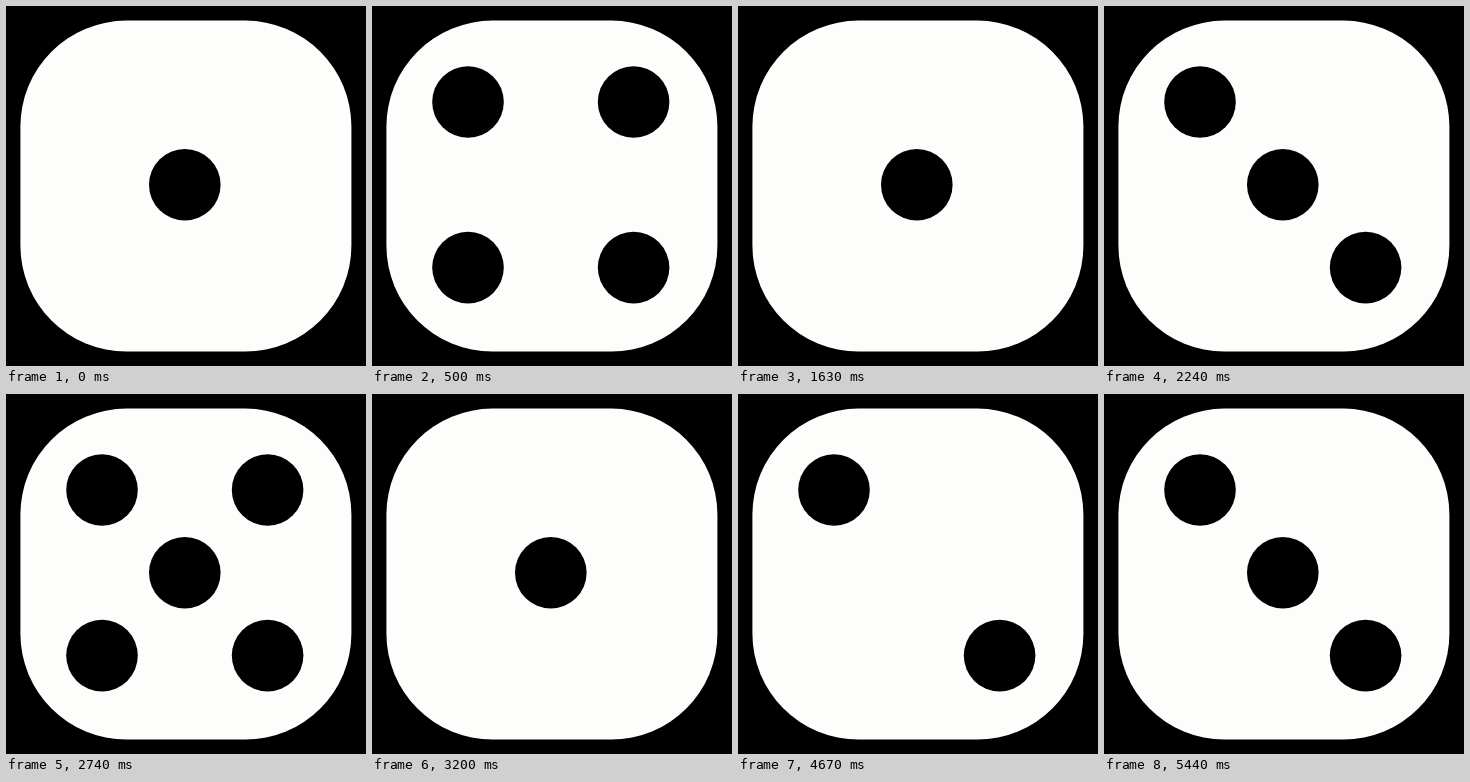
Recreate the animation shown at these times as an HTML page. Size 360x360 px, loop 5.47 s.

```html
<!DOCTYPE html>
<html lang="en">
<head>
<meta charset="utf-8">
<title>Rolling die</title>
<style>
  html, body { margin: 0; width: 100%; height: 100%; overflow: hidden; background: #000; }
  svg { display: block; width: 100vw; height: 100vh; }
  .body { fill: #fdfdfc; }
  .pip { visibility: hidden; }

  /* Each pip group shows on the faces that use it. */
  [data-face="1"] .mid, [data-face="3"] .mid, [data-face="5"] .mid,
  [data-face="2"] .fall, [data-face="3"] .fall,
  [data-face="4"] .fall, [data-face="5"] .fall, [data-face="6"] .fall,
  [data-face="4"] .rise, [data-face="5"] .rise, [data-face="6"] .rise,
  [data-face="6"] .side { visibility: visible; }
</style>
</head>
<body>
<svg id="die" viewBox="0 0 360 360" data-face="1">
  <rect class="body" x="14.4" y="14.6" width="331" height="331" rx="106"/>
  <g class="pip mid"><circle cx="178.8" cy="178.8" r="35.8"/></g>
  <g class="pip fall">
    <circle cx="96" cy="96" r="35.8"/>
    <circle cx="261.6" cy="261.6" r="35.8"/>
  </g>
  <g class="pip rise">
    <circle cx="261.6" cy="96" r="35.8"/>
    <circle cx="96" cy="261.6" r="35.8"/>
  </g>
  <g class="pip side">
    <circle cx="96" cy="178.8" r="35.8"/>
    <circle cx="261.6" cy="178.8" r="35.8"/>
  </g>
</svg>
<script>
  const LOOP = 5470;
  const HOLD = 4 * 1001 / 30; // four video frames per face
  const FACES = [1, 6, 5, 4, 3, 2];
  const die = document.getElementById('die');
  const start = performance.now();

  // Face changes land on whole hundredths of a second.
  const slotStart = n => Math.round(n * HOLD / 10) * 10;

  function slotAt(t) {
    const n = Math.round(t / HOLD);
    return slotStart(n) <= t ? n : n - 1;
  }

  function draw(now) {
    const t = Math.max(0, now - start) % LOOP;
    die.dataset.face = FACES[slotAt(t) % FACES.length];
    requestAnimationFrame(draw);
  }

  requestAnimationFrame(draw);
</script>
</body>
</html>
```
